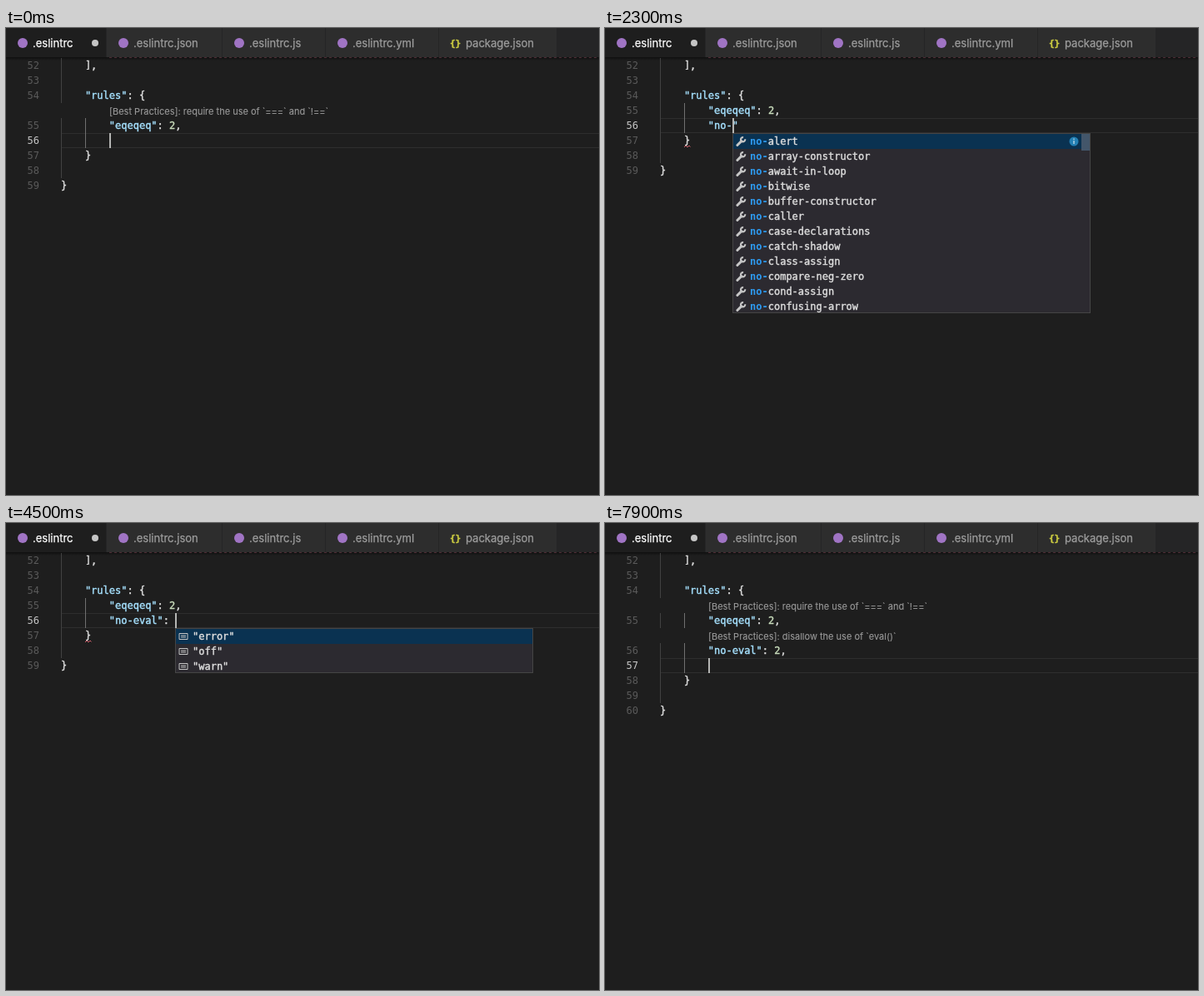
An HTML page that plays this animation: 712x560 px, repeating every 8000 ms.

```html
<!DOCTYPE html>
<html lang="en">
<head>
<meta charset="utf-8">
<title>Lint rule completion</title>
<style>
  html, body { margin: 0; width: 100%; height: 100%; overflow: hidden; background: #1e1e1e; }
  svg { display: block; width: 712px; height: 560px; }
  text { white-space: pre; font-variant-ligatures: none; font-feature-settings: "calt" 0; }
  text, tspan { fill: currentColor; stroke: currentColor; stroke-width: .25px; }
  .ui { font-family: Inter, "Open Sans", sans-serif; font-size: 13px; color: #9d9d9d; }
  .lens { font-family: Inter, "Open Sans", sans-serif; font-size: 11px; color: #999; stroke-width: .1px; }
  .code, .gutter { font-family: "DejaVu Sans Mono", monospace; font-size: 12px; }
  .code, .code tspan { stroke-width: .4px; }
  .code { color: #dedede; }
  .gutter { color: #5a5a5a; stroke: none; text-anchor: end; }
  .active { color: #fff; }
  .gutter.active { color: #c6c6c6; }
  .braces { color: #cbcb41; font-weight: bold; font-size: 11px; }
  .key { color: #a6e1fe; }
  .num { color: #c8dcbb; }
  .code .hit { color: #2e9bf2; font-weight: bold; stroke: none; }
</style>
</head>
<body>
<svg viewBox="0 0 712 560" xmlns="http://www.w3.org/2000/svg">
  <defs>
    <linearGradient id="shade" x2="0" y2="1">
      <stop stop-color="#000" stop-opacity=".5"/>
      <stop offset="1" stop-color="#000" stop-opacity="0"/>
    </linearGradient>
  </defs>
  <rect width="712" height="560" fill="#1e1e1e"/>
  <g id="tabs"></g>
  <g id="editor"></g>
</svg>
<script>
const LOOP = 8000, ROW = 18, TOP = 36, LEFT = 66, CHAR = 7.224, BLINK = 500;

const RULES = `accessor-pairs array-bracket-newline array-bracket-spacing array-callback-return
  array-element-newline arrow-body-style arrow-parens arrow-spacing block-scoped-var
  block-spacing brace-style callback-return`;
const NO_RULES = `no-alert no-array-constructor no-await-in-loop no-bitwise no-buffer-constructor
  no-caller no-case-declarations no-catch-shadow no-class-assign no-compare-neg-zero
  no-cond-assign no-confusing-arrow`;
const N_RULES = `new-cap new-parens newline-after-var newline-before-return
  newline-per-chained-call ` + NO_RULES;
const NO_E_RULES = `no-else-return no-empty no-empty-character-class no-empty-function
  no-empty-pattern no-eq-null no-eval no-ex-assign no-extend-native no-extra-bind
  no-extra-boolean-cast no-extra-label`;
const NO_EV_RULES = `no-eval no-implied-eval no-extend-native no-label-var no-delete-var
  no-unused-vars no-native-reassign no-process-env no-div-regex no-invalid-regexp
  lines-around-directive`;
const EVAL_RULES = 'no-eval no-implied-eval';

// [time, text on the edited line, suggestions]
const EDITS = [
  [0, ''],
  [400, '""'],
  [600, '""', RULES],
  [1800, '"n"', N_RULES],
  [2000, '"no"', NO_RULES],
  [2200, '"no-"', NO_RULES],
  [2800, '"no-e"', NO_E_RULES],
  [3000, '"no-ev"', NO_EV_RULES],
  [3200, '"no-eva"', EVAL_RULES],
  [3300, '"no-eval"', EVAL_RULES],
  [4200, '"no-eval": '],
  [4300, '"no-eval": ', '"error" "off" "warn"'],
  [4900, '"no-eval": 2'],
  [6900, '"no-eval": 2,']
];
const LENS_OFF = 800, LENS_ROOM = 5500, LENS_TEXT = 5700, ENTER = 7500;
const ERROR_ON = 1500, ERROR_OFF = 5900;
// Each change of the text restarts the caret's blinking.
const KEYS = EDITS.filter((e, i) => !i || e[1] !== EDITS[i - 1][1]).map(e => e[0]).concat(ENTER);

const last = (list, test) => list.filter(test).pop();
const rect = (x, y, w, h, fill) => `<rect x="${x}" y="${y}" width="${w}" height="${h}" fill="${fill}"/>`;
const label = (x, y, cls, body) => `<text x="${x}" y="${y}" class="${cls}">${body}</text>`;
const span = (cls, body) => `<tspan class="${cls}">${body}</tspan>`;

function drawTabs() {
  const tabs = [[0, 120, '.eslintrc'], [121, 259, '.eslintrc.json'], [260, 383, '.eslintrc.js'],
                [384, 519, '.eslintrc.yml'], [520, 661, 'package.json']];
  let out = rect(0, 0, 712, 35, '#252526');
  tabs.forEach(([x, end, name], i) => {
    out += rect(x, 0, end - x, 35, i ? '#2d2d2d' : '#1e1e1e');
    out += name === 'package.json'
      ? label(x + 13, 22, 'code braces', '{}')
      : `<circle cx="${x + 20}" cy="18" r="6" fill="#a074c4"/>`;
    out += label(x + 32, 23, i ? 'ui' : 'ui active', name);
  });
  out += '<circle cx="107" cy="18" r="4" fill="#c5c5c5"/>';
  out += rect(0, 35, 712, 4, 'url(#shade)');
  out += '<path d="M124 35.5H712" stroke="#4c2b33" stroke-dasharray="3 3"/>';
  return out;
}

function highlight(code) {
  return code.replace(/("[^"]*")|(\d)/g, (all, key) => span(key ? 'key' : 'num', all));
}

// Marks the typed letters greedily in order, skipping those that do not occur.
function markHits(name, typed) {
  const hits = new Set();
  let from = 0;
  for (const ch of typed) {
    const at = name.indexOf(ch, from);
    if (at >= 0) { hits.add(at); from = at + 1; }
  }
  return [...name].map((ch, i) => hits.has(i) ? span('hit', ch) : ch).join('');
}

const wrench = (x, y) => `<g transform="translate(${x} ${y})" fill="none" stroke="#c5c5c5" stroke-linecap="round">
  <path d="M1.9 10.5L6.8 5.6" stroke-width="3"/>
  <path d="M9.1 1.25A2.6 2.6 0 1 0 11.15 3.3" stroke-width="2.2" stroke-linecap="butt"/></g>`;

const valueIcon = (x, y) => `<path d="M${x + 1} ${y + 2.5}h10v7h-10zM${x + 3} ${y + 5}h6M${x + 3} ${y + 7}h6"
  fill="none" stroke="#c5c5c5"/>`;

function drawPopup(x, y, list, typed) {
  const names = list.trim().split(/\s+/).slice(0, 12);
  const isValue = names[0].startsWith('"');
  const height = names.length * ROW;
  let out = rect(x, y, 430, height, '#454545') + rect(x + 1, y + 1, 428, height - 2, '#2c2a30');
  out += rect(x + 1, y + 1, 428, ROW, '#0a3251');
  names.forEach((name, i) => {
    const top = y + i * ROW;
    out += (isValue ? valueIcon : wrench)(x + 4, top + 4);
    out += label(x + 21, top + 14, 'code', markHits(name, typed));
  });
  if (!isValue) {
    out += `<circle cx="${x + 410}" cy="${y + 10}" r="5.5" fill="#2380b4"/>`;
    out += rect(x + 409.3, y + 9, 1.4, 4, '#b9d6e6') + rect(x + 409.3, y + 6.6, 1.4, 1.4, '#b9d6e6');
  }
  if (names.length === 12) out += rect(x + 419, y + 1, 10, 20, '#43566a');
  return out;
}

function drawEditor(t) {
  const [, typed, list] = last(EDITS, e => e[0] <= t);
  const inQuotes = typed.endsWith('"');
  const entered = t >= ENTER;
  const hasLens = t < LENS_OFF || t >= LENS_ROOM;
  const lensText = t < LENS_OFF || t >= LENS_TEXT;
  const hasError = t >= ERROR_ON && t < ERROR_OFF;
  const caretOn = Math.floor((t - last(KEYS, k => k <= t)) / BLINK) % 2 === 0;

  const lines = [
    [4, '],'], [4, ''], [4, '"rules": {'],
    [8, '"eqeqeq": 2,', 'require the use of `===` and `!==`'],
    [8, typed, t >= LENS_ROOM && 'disallow the use of `eval()`'],
    ...(entered ? [[8, '']] : []),
    [4, '}'], [4, ''], [0, '}']
  ];
  const current = entered ? 5 : 4;
  const col = entered ? 0 : typed.length - (inQuotes ? 1 : 0);
  const caretX = Math.round(LEFT + (8 + col) * CHAR);
  let y = TOP, out = '', overlay = '';

  lines.forEach(([indent, code, lens], i) => {
    const x = LEFT + indent * CHAR;
    if (lens && hasLens) {
      if (lensText) out += label(124, y + 14, 'lens', '[Best Practices]: ' + lens);
      y += ROW;
    }
    if (i === current) {
      out += rect(LEFT, y, 646, 1, '#2e2e2e') + rect(LEFT, y + ROW - 1, 646, 1, '#2e2e2e');
      if (caretOn) overlay += rect(caretX, y, 2, ROW, '#b4b5b3');
      if (list) overlay += drawPopup(caretX, y + ROW, list, inQuotes ? typed.slice(1, -1) : '');
    }
    if (indent) out += rect(66, y, 1, ROW, '#414141');
    if (indent === 8) out += rect(95, y, 1, ROW, '#707070');
    out += label(40, y + 13, i === current ? 'gutter active' : 'gutter', 52 + i);
    out += label(x, y + 13, 'code', highlight(code));
    if (hasError && indent === 4 && code === '}') {
      out += `<path d="M95 ${y + 17}l2 -2l2 2l2 -2l1.5 1.5" fill="none" stroke="#d0606c"/>`;
    }
    y += ROW;
  });
  return out + overlay;
}

const editor = document.getElementById('editor');
document.getElementById('tabs').innerHTML = drawTabs();
let shown = '';

function tick() {
  const picture = drawEditor(performance.now() % LOOP);
  if (picture !== shown) editor.innerHTML = shown = picture;
  requestAnimationFrame(tick);
}
tick();
</script>
</body>
</html>
```
